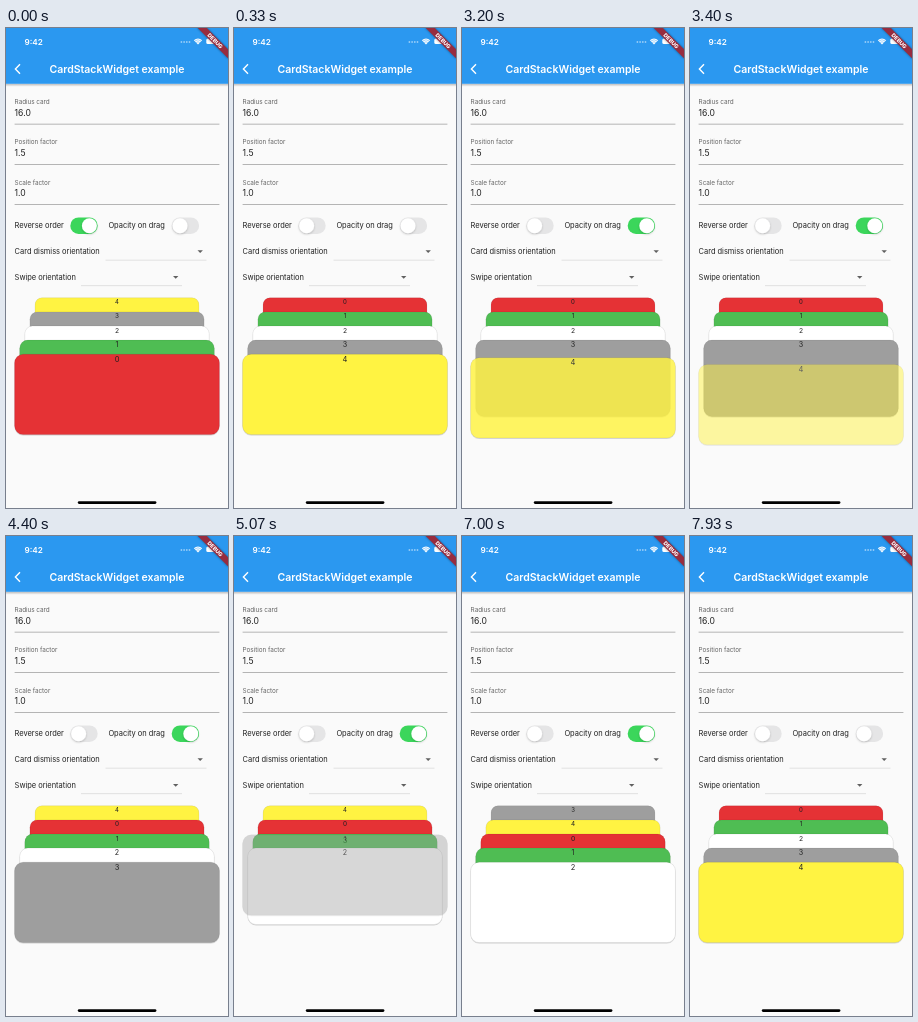
Write an HTML page that moves like this. It is 222 px wide and 480 px high and loops after 8 s.

```html
<!DOCTYPE html>
<html lang="en">
<head>
<meta charset="utf-8">
<title>Card stack example</title>
<style>
html, body { margin: 0; width: 100%; height: 100%; overflow: hidden; background: #fafafa; }
svg { display: block; width: 222px; height: 480px; }
text { font-family: Inter, Roboto, sans-serif; fill: #222; }
.title { font-size: 10.5px; font-weight: 600; fill: #fff; text-anchor: middle; }
.clock { font-size: 8.2px; font-weight: 600; fill: #fff; }
.hint { font-size: 6.4px; letter-spacing: -.05px; fill: #666; }
.value { font-size: 8.6px; }
.item { font-size: 7.5px; letter-spacing: -.03px; }
.num { font-size: 7.5px; text-anchor: middle; }
.debug { font-size: 5.5px; font-weight: 800; fill: #fff; text-anchor: middle; }
</style>
</head>
<body>
<svg viewBox="0 0 222 480" xmlns="http://www.w3.org/2000/svg">
  <defs>
    <linearGradient id="fade" x2="0" y2="1">
      <stop offset="0" stop-opacity=".25"/>
      <stop offset="1" stop-opacity="0"/>
    </linearGradient>
    <filter id="soft" x="-10%" y="-10%" width="120%" height="125%">
      <feDropShadow dx="0" dy=".5" stdDeviation=".6" flood-opacity=".3"/>
    </filter>
    <filter id="blur" x="-20%" y="-60%" width="140%" height="220%">
      <feGaussianBlur stdDeviation="1.2"/>
    </filter>
    <filter id="lift" x="-30%" y="-30%" width="160%" height="180%">
      <feDropShadow dx="0" dy="1" stdDeviation=".9" flood-opacity=".22"/>
    </filter>
  </defs>
  <rect width="222" height="480" fill="#fafafa"/>
  <g id="form"></g>
  <g id="stack"></g>
  <g id="switches"></g>

  <rect y="55.8" width="222" height="3" fill="url(#fade)"/>
  <rect width="222" height="55.8" fill="#2b98f0"/>
  <path d="M14 36.3L9.4 41L14 45.7" fill="none" stroke="#fff" stroke-width="1.4"/>
  <text class="title" x="111" y="44.8">CardStackWidget example</text>
  <text class="clock" x="18.5" y="16.5">9:42</text>
  <g fill="#fff" fill-opacity=".5">
    <circle cx="175.4" cy="14" r=".9"/><circle cx="178.1" cy="14" r=".9"/>
    <circle cx="180.8" cy="14" r=".9"/><circle cx="183.5" cy="14" r=".9"/>
  </g>
  <path d="M187.8 12.2Q192 8.6 196.2 12.2L192 16.6Z" fill="#fff"/>
  <path d="M188.6 13.1Q192 10.4 195.4 13.1M190.1 14.5Q192 13 193.9 14.5" fill="none" stroke="#2b98f0" stroke-width=".45"/>
  <rect x="200.3" y="10.6" width="11.6" height="5.4" rx="1.5" fill="#fff"/>
  <g transform="translate(222 0) rotate(45)">
    <rect x="-22" y="15" width="44" height="6.4" filter="url(#blur)" opacity=".45"/>
    <rect x="-22" y="15" width="44" height="6.4" fill="#972c3f"/>
    <text class="debug" x="0" y="20.2">DEBUG</text>
  </g>
  <rect x="71.8" y="473.2" width="78.6" height="2.7" rx="1.35"/>
</svg>
<script>
const LOOP = 8000;
const COLORS = ['#e53035', '#4fbd53', '#fff', '#9e9e9e', '#fff343'];
const OFF = [229, 229, 230], DIM = [190, 203, 192], ON = [59, 214, 91];

const byId = id => document.getElementById(id);
const clamp = x => Math.min(1, Math.max(0, x));
const span = (t, start, length) => clamp((t - start) / length);
const easeOut = x => 1 - (1 - x) ** 3;
const easeBoth = x => x * x * (3 - 2 * x);
const mix = (a, b, x) => a.map((v, i) => Math.round(v + (b[i] - v) * x));

function add(parent, tag, attrs, label) {
  const el = document.createElementNS('http://www.w3.org/2000/svg', tag);
  for (const key in attrs) el.setAttribute(key, attrs[key]);
  if (label) el.textContent = label;
  return parent.appendChild(el);
}

const form = byId('form');
const write = (cls, x, y, label) => add(form, 'text', { class: cls, x, y }, label);
const rule = (x, y, width, fill) => add(form, 'rect', { x, y, width, height: .6, fill });

[['Radius card', '16.0'], ['Position factor', '1.5'], ['Scale factor', '1.0']].forEach(([hint, value], i) => {
  const y = i * 40.2;
  write('hint', 8.6, 76.2 + y, hint);
  write('value', 8.6, 87.7 + y, value);
  rule(8.6, 95.8 + y, 204.8, '#858585');
});
write('item', 8.6, 200.3, 'Reverse order');
write('item', 102.4, 200.3, 'Opacity on drag');
[['Card dismiss orientation', 226, 99.5], ['Swipe orientation', 251.7, 75]].forEach(([label, y, x]) => {
  write('item', 8.6, y, label);
  rule(x, y + 5.8, 101, '#d0d0d0');
  add(form, 'path', { d: `M${x + 92} ${y - 3.7}h5.4l-2.7 2.7z`, fill: '#606060' });
});

function makeSwitch(x) {
  const g = add(byId('switches'), 'g', { transform: `translate(${x} 189.4)` });
  const track = add(g, 'rect', { width: 27.4, height: 16.6, rx: 8.3 });
  const thumb = add(g, 'rect', { y: .8, height: 15, rx: 7.5, fill: '#fff', filter: 'url(#lift)' });
  return (on, stretch = 0) => {
    const tint = on < .15 ? mix(OFF, DIM, on / .15) : mix(DIM, ON, (on - .15) / .85);
    track.setAttribute('fill', `rgb(${tint})`);
    thumb.setAttribute('x', .8 + (10.8 - stretch) * easeBoth(on));
    thumb.setAttribute('width', 15 + stretch);
  };
}
const setReverse = makeSwitch(64.3);
const setOpacity = makeSwitch(165.7);

const stack = byId('stack');
const cards = COLORS.map((fill, i) => {
  const g = add(stack, 'g', { filter: 'url(#soft)' });
  add(g, 'rect', {
    x: -102.4, width: 204.8, height: 80.4, rx: 8.6, fill,
    stroke: '#000', 'stroke-opacity': .14, 'stroke-width': .5
  });
  add(g, 'text', { class: 'num', x: 0, y: 7.7 }, String(i));
  return g;
});

// depth 0 is the front card, 4 the rearmost
function place(card, depth, dy = 0, alpha = 1) {
  const scale = 1 - .05 * depth;
  card.setAttribute('transform', `translate(111 ${326.2 - 14.1 * depth + dy}) scale(${scale})`);
  card.setAttribute('opacity', alpha);
}

// [start, cards from back to front, length of the slide forward]
const STATES = [
  [0, [4, 3, 2, 1, 0]],
  [70, [0, 1, 2, 3, 4]],
  [3600, [0, 1, 2, 3]],
  [3985, [4, 0, 1, 2, 3], 200],
  [5200, [4, 0, 1, 2]],
  [5385, [3, 4, 0, 1, 2], 200],
  [7600, [0, 1, 2, 3, 4]]
];
// swipes: start, length, curve, travel
const SWIPES = [[2960, 640, 1.8, 20], [4760, 440, 1.5, -46]];

let shown;
function drawStack(t) {
  const state = STATES.filter(s => s[0] <= t).pop();
  const [start, order, slide] = state;
  if (shown !== state) {
    shown = state;
    cards.forEach((card, i) => card.setAttribute('display', order.includes(i) ? 'inline' : 'none'));
    order.forEach(i => stack.appendChild(cards[i]));
  }
  const lag = slide ? 1 - easeOut(span(t, start, slide)) : 0;
  order.forEach((id, k) => place(cards[id], 4 - k + (k ? lag : 0)));
  for (const [from, length, curve, travel] of SWIPES) {
    if (t > from && t < from + length) {
      const u = span(t, from, length) ** curve;
      place(cards[order[4]], 0, travel * u, 1 - u);
    }
  }
}

function draw(t) {
  setReverse(1 - span(t, 50, 270));
  const held = t >= 6670 && t < 7000 ? 1 : 0;
  setOpacity(span(t, 1960, 340) - span(t, 7580, 340), held);
  drawStack(t);
}

const begin = performance.now();
function tick() {
  draw((performance.now() - begin) % LOOP);
  requestAnimationFrame(tick);
}
draw(0);
requestAnimationFrame(tick);
</script>
</body>
</html>
```
